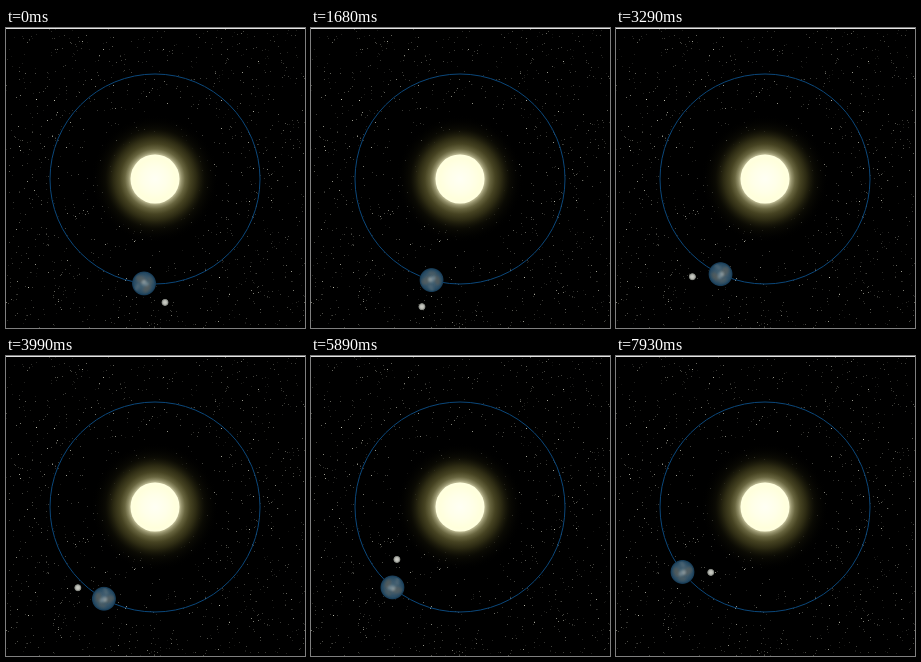
Animation of 299x300 px, one loop 8 s. Source, as an HTML page with a canvas:

```html
<!DOCTYPE html>
<html lang="en">
<head>
<meta charset="utf-8">
<title>Sun, Earth and Moon</title>
<style>
  html, body { margin: 0; width: 100%; height: 100%; overflow: hidden; background: #000; }
  canvas { display: block; width: 100vw; height: 100vh; }
</style>
</head>
<body>
<canvas id="stage" width="299" height="300"></canvas>
<script>
const W = 299, H = 300, LOOP = 8000, STEPS = 114, STEP_MS = LOOP / STEPS;
const LEAD_MS = 12; // pictures change slightly ahead of an even beat
const SUN = { x: 149, y: 151, r: 24.5 };
const ORBIT = 105, MOON_ORBIT = 28.3, EARTH_R = 12.5;
const rad = deg => deg * Math.PI / 180;
const ctx = document.getElementById('stage').getContext('2d');

function disc(c, x, y, r, fill) {
  c.fillStyle = fill;
  c.beginPath();
  c.arc(x, y, r, 0, Math.PI * 2);
  c.fill();
}

function radial(c, x, y, r, stops) {
  const g = c.createRadialGradient(x, y, 0, x, y, r);
  stops.forEach(([at, color]) => g.addColorStop(at, color));
  return g;
}

function seeded(seed) {
  return () => (seed = (seed * 16807) % 2147483647) / 2147483647;
}

// Stars are sparser near the sun; most are faint.
function drawStars(c) {
  const rnd = seeded(4219);
  for (let i = 0; i < 1500; i++) {
    const x = Math.floor(rnd() * W), y = Math.floor(rnd() * H);
    const level = Math.round(16 + 55 * rnd() + 130 * rnd() ** 12);
    if (rnd() * 120 > Math.hypot(x - SUN.x, y - SUN.y)) continue;
    c.fillStyle = `rgb(${level},${level},${Math.round(level * 0.92)})`;
    c.fillRect(x, y, 1, 1);
  }
}

function makeBackdrop() {
  const layer = document.createElement('canvas');
  layer.width = W;
  layer.height = H;
  const c = layer.getContext('2d');
  c.fillStyle = '#000';
  c.fillRect(0, 0, W, H);
  drawStars(c);

  const { x, y, r } = SUN;
  disc(c, x, y, 64, radial(c, x, y, 64, [
    [0, '#d2cfa6'], [0.38, '#c2bf98'], [0.42, '#918e68'], [0.47, '#68653f'],
    [0.55, '#464322'], [0.65, '#2b2912'], [0.78, '#15140780'], [1, '#00000000']
  ]));
  disc(c, x, y, r, radial(c, x, y, r, [
    [0, '#fffff4'], [0.5, '#ffffe8'], [0.85, '#ffffdc'], [1, '#ffffdf']
  ]));

  c.strokeStyle = '#0b477a';
  c.lineWidth = 1;
  c.beginPath();
  c.arc(x, y, ORBIT, 0, Math.PI * 2);
  c.stroke();

  c.fillStyle = '#e4e4e4';
  c.fillRect(0, 0, W, 1);
  return layer;
}

function patch(x, y, rx, ry, turn, color) {
  ctx.fillStyle = color;
  ctx.beginPath();
  ctx.ellipse(x, y, rx, ry, turn, 0, Math.PI * 2);
  ctx.fill();
}

// The globe is seen from above a pole, so its surface turns in the plane.
function drawEarth(x, y, spin) {
  ctx.save();
  ctx.translate(x, y);
  disc(ctx, 0, 0, EARTH_R, radial(ctx, 0, 0, EARTH_R, [
    [0, '#4b6878'], [0.55, '#38566a'], [0.8, '#274a62'], [0.92, '#173c57'], [1, '#0a203200']
  ]));
  ctx.beginPath();
  ctx.arc(0, 0, EARTH_R - 1.8, 0, Math.PI * 2);
  ctx.clip();
  ctx.rotate(spin);
  ctx.filter = 'blur(1px)';
  patch(-3, -4, 6, 3.5, 0.5, '#69645a77');
  patch(3, 5, 3, 5, 0.7, '#665f5077');
  patch(6, -3, 2.5, 4, -0.4, '#5d615c66');
  patch(-7, 4, 2, 4, 0.5, '#6a7a8266');
  patch(1, 0, 4, 2.2, 0.3, '#8a9ba399');
  patch(0, -2, 1.8, 1.2, 0, '#b0bcc099');
  ctx.restore();
}

function drawMoon(x, y) {
  disc(ctx, x, y, 4, radial(ctx, x, y, 4, [
    [0, '#cfd0c9'], [0.5, '#b6b8b1'], [0.8, '#787b75'], [1, '#20222000']
  ]));
}

const backdrop = makeBackdrop();

function draw(now) {
  const step = Math.min(STEPS - 1, Math.floor((now % LOOP + LEAD_MS) / STEP_MS));
  const seconds = step * STEP_MS / 1000;
  const along = rad(96 + 5.775 * seconds);
  const moon = rad(42.1 + 40.2 * seconds);
  const x = SUN.x + ORBIT * Math.cos(along);
  const y = SUN.y + ORBIT * Math.sin(along);

  ctx.drawImage(backdrop, 0, 0);
  drawEarth(x, y, step * 0.41 * Math.PI * 2);
  drawMoon(x + MOON_ORBIT * Math.cos(moon), y + MOON_ORBIT * Math.sin(moon));
}

const start = performance.now();
function tick() {
  draw(performance.now() - start);
  requestAnimationFrame(tick);
}
tick();
</script>
</body>
</html>
```
